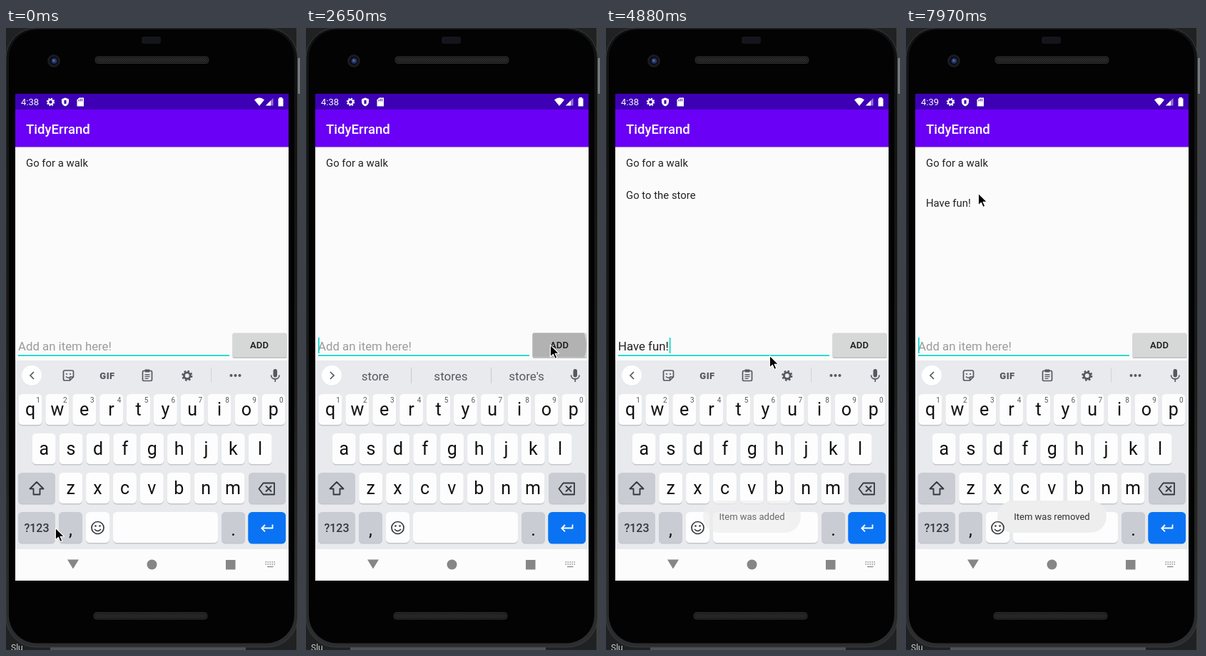
Animation, 412 px wide and 870 px high, one loop 8000 ms. Source, as an HTML page:

```html
<!DOCTYPE html>
<html lang="en">
<head>
<meta charset="utf-8">
<title>To-do list demo</title>
<style>
html, body { margin: 0; width: 100%; height: 100%; overflow: hidden; background: #202122; }
svg { display: block; width: 100%; height: 100%; }
text { font-family: Roboto, sans-serif; white-space: pre; }
</style>
</head>
<body>
<svg id="stage" viewBox="0 0 412 870"></svg>
<script>
const LOOP = 8000, TICK = 147.4;
const GREY = '#55595e', INK = '#34383c', TEAL = '#14d9cb';
const stage = document.getElementById('stage');

// Markup helpers
const rect = (x, y, w, h, fill, rx = 0, more = '') =>
  `<rect x="${x}" y="${y}" width="${w}" height="${h}" rx="${rx}" fill="${fill}" ${more}/>`;
const circle = (x, y, r, fill, more = '') => `<circle cx="${x}" cy="${y}" r="${r}" fill="${fill}" ${more}/>`;
const text = (x, y, size, fill, str, more = '') =>
  `<text x="${x}" y="${y}" font-size="${size}" fill="${fill}" ${more}>${str}</text>`;
const path = (d, fill, more = '') => `<path d="${d}" fill="${fill}" ${more}/>`;
const line = (d, color, w = 1.7, more = '') => path(d, 'none', `stroke="${color}" stroke-width="${w}" ${more}`);
const group = (id, body) => `<g id="${id}">${body}</g>`;
const MID = 'text-anchor="middle"', MEDIUM = 'font-weight="500"';

function gear(x, y, s, color) {
  const teeth = Math.PI * 6.6 * s / 8;
  return circle(x, y, 4.6 * s, 'none', `stroke="${color}" stroke-width="${3 * s}"`) +
    circle(x, y, 6.6 * s, 'none', `stroke="${color}" stroke-width="${2.8 * s}" stroke-dasharray="${teeth}"`);
}

function speaker(x, y) {
  return rect(x, y, 159, 9.5, '#1d1d1e', 4, 'stroke="#2b2c2d"') + rect(x + 2, y + 2, 155, 5.5, 'url(#mesh)', 3);
}

function phone() {
  return text(7, 871, 12, '#d0d0d0', 'Slu') +
    rect(407, 0, 5, 870, '#3e4042') + rect(409, 42, 3, 50, '#77797b') +
    rect(62, 866, 274, 4, '#515254') +
    rect(0, 0, 408.5, 866, 'url(#rim)', 42, 'stroke="#3a3b3d"') +
    rect(4, 2.5, 400, 858, '#030303', 39) +
    rect(190, 12, 27, 10, '#15151c', 3) +
    circle(67, 46, 9, '#1a1b20') + circle(67, 46, 6, '#0b0d18') +
    circle(67.5, 46, 3.8, '#253868') + circle(67, 45.5, 1.5, '#5673a8') +
    speaker(125, 40) + speaker(123, 817.5);
}

function statusBar() {
  return rect(13, 92, 383, 22.5, '#3e00b5') +
    text(21, 108, 13, '#fff', '4:38', 'id="clock"') +
    gear(62.5, 103.5, .72, '#fff') +
    path('M83 97.5l5 2v3.8c0 3-2 5-5 6.2c-3-1.2-5-3.2-5-6.2v-3.8z', '#fff') +
    path('M81.5 101h3v5h-3z', '#3e00b5') +
    path('M102.5 97.5h6.5v12h-9.500v-9z', '#fff') +
    path('M102 100v2.5M104.3 99v3.5M106.6 99v3.5', 'none', 'stroke="#3e00b5"') +
    path('M348 100.5Q355 94.5 362 100.5L355 109z', '#fff') +
    path('M364 108.5L374.5 98v10.5z', '#fff', 'opacity=".45"') +
    path('M364 108.5L371 101.5v7z', '#fff') +
    path('M383 97h4v1.5h1.5v11h-7v-11h1.5z', '#fff');
}

function app() {
  const item = (id, y, str) => text(28, y, 14.9, '#222', str, `id="${id}"`);
  return rect(13, 92, 383, 681, '#fbfbfb') + statusBar() +
    rect(13, 114, 383, 52.5, '#6a00f6') +
    text(28, 147.5, 18.6, '#fff', 'TidyErrand', MEDIUM) +
    item('walk', 194, 'Go for a walk') + item('store', 239, 'Go to the store') + item('fun', 284, 'Have fun!') +
    text(17, 450.7, 16.8, '#9b9b9b', 'Add an item here!', 'id="hint"') +
    text(17, 450.7, 16.8, '#222', '', 'id="typed"') +
    rect(17, 453, 0, 1, '#222', 0, 'id="under"') +
    rect(17, 457.2, 296, 1.8, TEAL) +
    rect(17, 433, 1.8, 22, TEAL, 0, 'id="caret"') +
    rect(317.5, 427.5, 76, 34.5, '#bfbfbf', 2) + rect(317.5, 426.5, 75.5, 34, '#d6d7d7', 2) +
    `<g clip-path="url(#button)">${circle(343, 444, 0, '#b2b2b2', 'id="ripple"')}</g>` +
    text(355, 448, 13, '#161616', 'ADD', `${MID} ${MEDIUM} letter-spacing=".2"`);
}

function toolbar() {
  return line('M39 481l-5 5l5 5', GREY) +
    line('M80.5 481q0-2 2-2h10q2 0 2 2v7l-5 5h-7q-2 0-2-2zM94.5 488h-3q-2 0-2 2v3', GREY) +
    circle(85, 484, 1.1, GREY) + circle(90, 484, 1.1, GREY) + line('M84 487.5q3.5 3.5 7 0', GREY, 1.4) +
    text(142, 490.5, 13, GREY, 'GIF', `${MID} font-weight="900" letter-spacing=".5"`) +
    rect(191.5, 479.5, 13, 14, 'none', 1.5, `stroke="${GREY}" stroke-width="1.7"`) +
    rect(194.5, 477.5, 7, 4, GREY, 1) + line('M194.5 485h7M194.5 487.7h7M194.5 490.4h5', GREY, 1.3) +
    gear(253.8, 486.3, .95, GREY) + rect(287, 476, 1, 20, '#d0d3d8') +
    [315.5, 321.5, 327.5].map(x => circle(x, 486, 2, GREY)).join('');
}

function suggestions() {
  return line('M34 481l5 5l-5 5', GREY) +
    rect(147, 475, 1, 22, '#c6c9ce') + rect(259, 475, 1, 22, '#c6c9ce') +
    [97, 203, 309].map((x, i) => text(x, 492.5, 17, GREY, '', `${MID} id="word${i}"`)).join('');
}

function key(x, y, w, label = '', fill = '#fdfdfd', edge = '#c3c6cc') {
  return rect(x, y + 1, w, 43.5, edge, 5.5) + rect(x, y, w, 43, fill, 5.5) +
    text(x + w / 2, y + 30, 25, '#111', label, MID);
}

function keyboard() {
  const pitch = 37.87, dark = '#c9ccd3', blue = '#0a73f3';
  const row = (letters, x, y) => [...letters].map((c, i) => key(x + i * pitch, y, 33, c)).join('');
  const hints = [...'1234567890'].map((c, i) => text(45 + i * pitch, 523.5, 10, GREY, c, MID)).join('');
  return rect(13, 465, 383, 264, '#e8eaed') +
    circle(36, 486.5, 14, '#d6d8dc') + circle(36, 486, 14, '#fff') +
    group('tools', toolbar()) + group('words', suggestions()) +
    rect(374.5, 477, 5.5, 11.5, GREY, 2.75) +
    line('M371.5 485.5c0 7.3 11.5 7.3 11.5 0M377.25 491v4', GREY) +
    row('qwertyuiop', 17.5, 512) + hints + row('asdfghjkl', 36.7, 567) + row('zxcvbnm', 74.2, 622) +
    key(17, 622, 52, '', dark) + key(340, 622, 52, '', dark) +
    line('M43 635l9.5 9.5h-5v8h-9v-8h-5z', INK, 1.8, 'stroke-linejoin="round"') +
    line('M354.5 644.5l6-8h15.5v16h-15.5zM364 640.5l8 8m0-8l-8 8', INK, 1.8, 'stroke-linejoin="round"') +
    key(17, 677, 52, '', dark) + text(43, 705, 16, INK, '?123', `${MID} ${MEDIUM}`) +
    key(74, 677, 33, '', dark) + text(90.5, 710, 25, '#111', ',', MID) +
    key(112, 677, 33) +
    key(150, 677, 147) + key(302, 677, 33, '', dark) + text(318.5, 710, 25, '#111', '.', MID) +
    key(339.5, 677, 52.5, '', blue, blue) +
    line('M373.5 694.5v5h-15M363 695l-4.700 4.700l4.700 4.700', '#fff', 1.800);
}

function smiley() {
  return circle(128.5, 699, 8.5, 'none', `stroke="${INK}" stroke-width="1.7"`) +
    circle(125.5, 696.5, 1.3, INK) + circle(131.5, 696.5, 1.3, INK) +
    line('M124 701q4.5 5 9 0', INK, 1.6);
}

function navBar() {
  const c = '#868686';
  const dots = [747, 750].map(y => line(`M363.500 ${y}h14`, c, 1.3, 'stroke-dasharray="1.4 1.6"')).join('');
  return rect(13, 729, 383, 44, '#fcfcfc') + path('M86 743.5h16l-8 13z', c) +
    circle(204.5, 750.5, 7, c) + rect(308, 744, 13.5, 13.5, c) + dots + line('M366 753.5h8.500', c, 1.3);
}

function toast(id, x, w, str) {
  return group(id, rect(x, 661, w, 45, '#eeeeef', 22.5) + text(204.5, 688, 13, '#303030', str, MID));
}

stage.innerHTML = `<defs>
  <pattern id="mesh" width="3" height="3" patternUnits="userSpaceOnUse">
    <path d="M0 3L3 0" stroke="#3c3d3e" stroke-width=".8"/></pattern>
  <linearGradient id="rim" x2="0" y2="1">
    <stop stop-color="#101112"/><stop offset=".5" stop-color="#17181a"/><stop offset="1" stop-color="#2c2d2f"/>
  </linearGradient>
  <clipPath id="button">${rect(317.5, 426.5, 75.5, 34, '#000', 2)}</clipPath></defs>` +
  rect(0, 0, 412, 870, '#202122') + phone() + app() + keyboard() + navBar() +
  toast('added', 136, 137, 'Item was added') + toast('removed', 128, 153, 'Item was removed') + smiley() +
  group('mouse', path('M-.6-.6v16.5l3.9-3.6l2.7 6.1l2.8-1.2l-2.7-6h5.3z', '#000',
    'stroke="#fff" stroke-width="1.1" stroke-linejoin="round"'));

const el = {};
stage.querySelectorAll('[id]').forEach(n => el[n.id] = n);

// Typing: tick, text, underlined letters of the last word, suggestions
const typing = [
  [0, '', 0, ''],
  [2, 'G', 1, 'G Go Good'],
  [3, 'Go', 2, 'Go Good Going'],
  [4, 'Go t', 1, 'to the that'],
  [5, 'Go to', 2, 'to too today'],
  [6, 'Go to ', 0, 'the a be'],
  [7, 'Go to th', 2, 'the this their'],
  [8, 'Go to the ', 3, 'the The their'],
  [10, 'Go to the s', 1, 'same store side'],
  [11, 'Go to the st', 2, 'store state still'],
  [12, 'Go to the sto', 3, 'store stop story'],
  [14, 'Go to the stor', 4, 'store stores story'],
  [15, 'Go to the store', 5, "store stores store's"],
  [18, '', 0, "store stores store's"],
  [23, 'H', 1, 'H Have Hello'],
  [24, 'Ha', 1, 'H Have Hello'],
  [25, 'Hav', 3, 'Have Having Haven'],
  [26, 'Have', 4, 'Have Haven Haves'],
  [27, 'Have ', 0, 'a you to'],
  [28, 'Have f', 1, 'for fun from'],
  [29, 'Have fu', 2, 'fun full future'],
  [30, 'Have fun', 3, 'fun fund funny'],
  [32, 'Have fun!', 0, ''],
  [38, '', 0, '']
];

// Tracks: [tick, value...] points, linear in between
const tracks = {
  mouse: [[14, 70, 700], [15, 82, 682], [18, 343, 444], [21, 230, 459], [34, 230, 459], [36, 389, 446],
    [37, 345, 440], [38, 340, 439], [40, 340, 439], [43, 102, 232]],
  ripple: [[17, 0], [18, 50], [19, 90], [37, 0], [38, 90]],
  press: [[18, 1], [19, .6], [20, 0], [37, 0], [38, 1], [39, .9], [40, .4], [41, 0]],
  store: [[18, 0], [19, .75], [20, 1], [51, 1], [52, .4], [53, 0]],
  fun: [[38, 0], [39, .75], [40, 1]],
  funY: [[52, 284], [53, 275], [54, 250]],
  added: [[18, 0], [19, .25], [20, .75], [21, 1], [32, 1], [33, .72], [34, .25], [35, 0],
    [38, 0], [39, .24], [40, .75], [41, 1], [51, 1], [52, .6], [53, 0]],
  removed: [[52, 0], [53, .6], [54, 1]]
};

function sample(name, k) {
  const pts = tracks[name];
  const i = pts.findIndex(p => p[0] > k);
  if (i < 0) return pts[pts.length - 1].slice(1);
  if (i === 0) return pts[0].slice(1);
  const a = pts[i - 1], b = pts[i], u = (k - a[0]) / (b[0] - a[0]);
  return a.slice(1).map((v, j) => v + (b[j + 1] - v) * u);
}

const show = (node, on) => node.setAttribute('opacity', Number(on));

function drawInput(k) {
  const [, str, marked, words] = typing.filter(row => row[0] <= k).pop();
  el.typed.textContent = str;
  const start = str.trimEnd().lastIndexOf(' ') + 1;
  const width = (from, n) => n ? el.typed.getSubStringLength(from, n) : 0;
  el.under.setAttribute('x', 17 + width(0, start));
  el.under.setAttribute('width', width(start, marked));
  el.caret.setAttribute('x', 17 + (str ? width(0, str.length) + 1 : 0));
  const blinkOn = Math.floor((k * TICK - 5600) / 500) % 2 === 0;
  show(el.caret, k >= 38 ? blinkOn : k >= 2);
  show(el.hint, !str);
  show(el.tools, !words);
  show(el.words, Boolean(words));
  words.split(' ').forEach((w, i) => el['word' + i].textContent = w);
}

function draw(ms) {
  const k = Math.floor((ms + 4) / TICK);
  drawInput(k);
  for (const id of ['store', 'fun', 'added', 'removed']) show(el[id], sample(id, k)[0]);
  el.fun.setAttribute('y', sample('funY', k)[0]);
  el.ripple.setAttribute('r', sample('ripple', k)[0]);
  show(el.ripple, sample('press', k)[0]);
  el.mouse.setAttribute('transform', `translate(${sample('mouse', k)})`);
  el.clock.textContent = k < 46 ? '4:38' : '4:39';
}

const begin = performance.now();
function loop() {
  draw((performance.now() - begin) % LOOP);
  requestAnimationFrame(loop);
}
loop();
</script>
</body>
</html>
```
